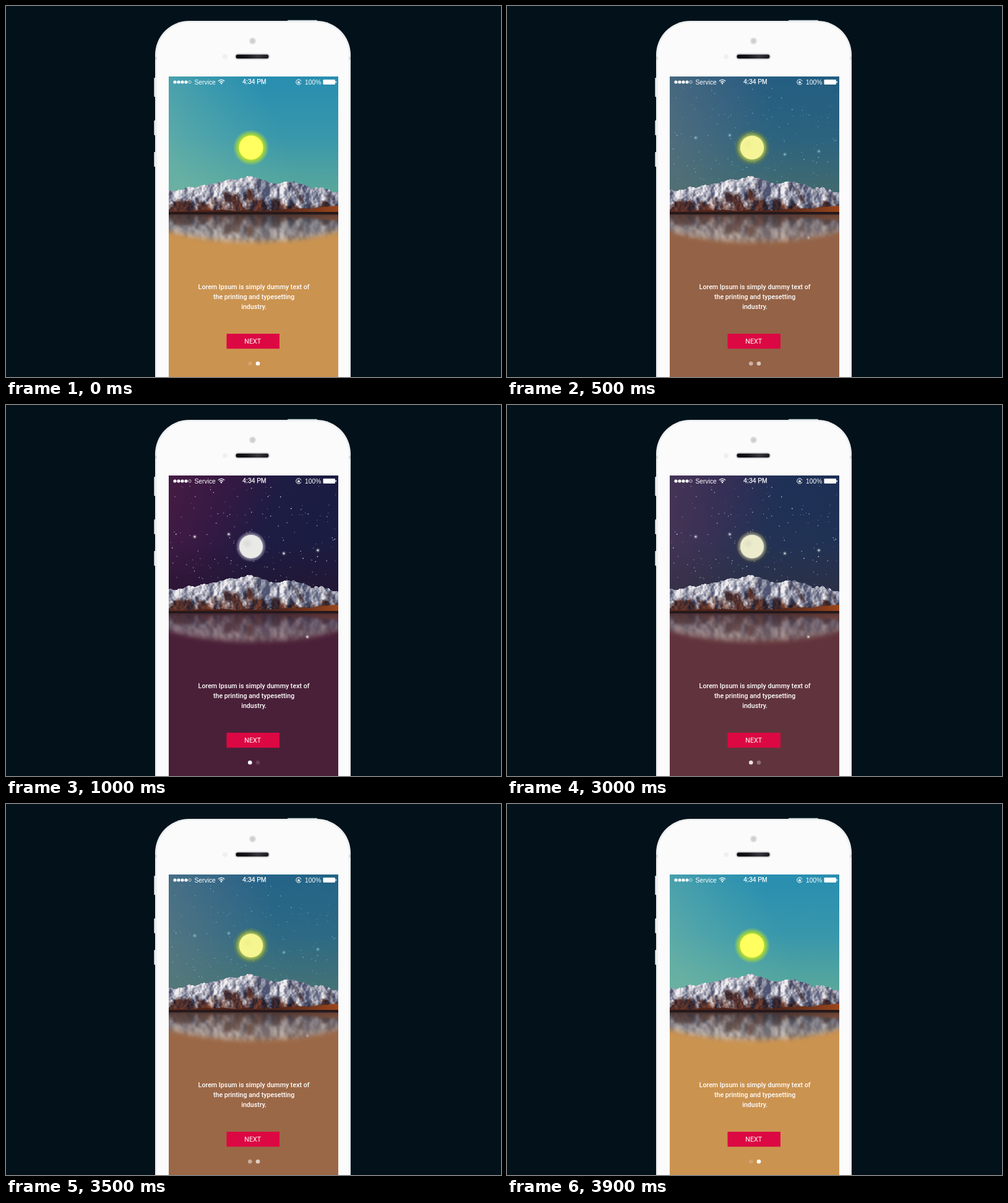
These frames come from a looping animation (800 px wide and 600 px high, 5900 ms). An HTML page with a canvas:

```html
<!DOCTYPE html>
<html lang="en">
<head>
<meta charset="utf-8">
<title>Day and night onboarding</title>
<style>
  html, body { margin: 0; width: 100%; height: 100%; overflow: hidden; background: #02111a; }
  canvas { display: block; }
</style>
</head>
<body>
<canvas id="stage" width="800" height="600"></canvas>
<script>
const ctx = document.getElementById('stage').getContext('2d');
const LOOP = 5900, STEP = 100;
const LEFT = 263, TOP = 114, WIDTH = 274, HEIGHT = 486;
const RIGHT = LEFT + WIDTH, SHORE = 331, WATER = 336;
const PEAKS = [[LEFT, 299], [320, 290], [355, 283], [398, 275], [430, 287], [460, 283], [493, 295], [508, 293], [RIGHT, 303]];

const clamp = (v, lo = 0, hi = 1) => Math.max(lo, Math.min(hi, v));
const mix = (a, b, k) => a + (b - a) * k;
const blend = (a, b, k) => a.map((v, i) => mix(v, b[i], k));

function seeded(seed) {
  return () => (seed = (seed * 16807) % 2147483647) / 2147483647;
}

function layer(draw) {
  const canvas = document.createElement('canvas');
  canvas.width = 800;
  canvas.height = 600;
  draw(canvas.getContext('2d'));
  return canvas;
}

function gradient(g, x0, y0, x1, y1, ...colors) {
  const fill = g.createLinearGradient(x0, y0, x1, y1);
  colors.forEach((c, i) => fill.addColorStop(i / (colors.length - 1), c));
  return fill;
}

function rect(g, x, y, w, h, fill, radius = 0) {
  g.fillStyle = fill;
  g.beginPath();
  g.roundRect(x, y, w, h, radius);
  g.fill();
}

function disc(g, x, y, r, fill) {
  g.fillStyle = fill;
  g.beginPath();
  g.arc(x, y, r, 0, 7);
  g.fill();
}

function arc(g, x, y, r, from, to, width) {
  g.strokeStyle = '#fff';
  g.lineWidth = width;
  g.beginPath();
  g.arc(x, y, r, from, to);
  g.stroke();
}

function glow(g, x, y, inner, outer, rgb, alpha) {
  const fill = g.createRadialGradient(x, y, inner, x, y, outer);
  fill.addColorStop(0, `rgba(${rgb},${alpha})`);
  fill.addColorStop(1, `rgba(${rgb},0)`);
  disc(g, x, y, outer, fill);
}

function label(g, text, x, y, font, align = 'left') {
  g.fillStyle = '#fff';
  g.font = font;
  g.textAlign = align;
  g.fillText(text, x, y);
}

function sparkle(g, x, y) {
  glow(g, x, y, 0, 4, '255,255,255', .6);
  disc(g, x, y, 1.1, '#fff');
}

// Smooth value noise on a seeded lattice, summed over octaves.
const lattice = Array.from({ length: 4096 }, seeded(2024));
function noise(x, y) {
  const i = Math.floor(x), j = Math.floor(y);
  const at = (a, b) => lattice[(a & 63) + 64 * (b & 63)];
  const ease = t => t * t * (3 - 2 * t);
  const u = ease(x - i), v = ease(y - j);
  return mix(mix(at(i, j), at(i + 1, j), u), mix(at(i, j + 1), at(i + 1, j + 1), u), v);
}
const terrain = (x, y) => .55 * noise(x / 13, y / 17) + .3 * noise(x / 6, y / 8) + .15 * noise(x / 2.5, y / 3);

function slopeY(x) {
  x = clamp(x, LEFT, RIGHT);
  const i = Math.max(1, PEAKS.findIndex(p => p[0] >= x));
  const [a, b] = [PEAKS[i - 1], PEAKS[i]];
  return mix(a[1], b[1], (x - a[0]) / (b[0] - a[0]));
}
const ridgeY = x => slopeY(x) + 4 * (noise(x / 5, 9) - .5);

const day = layer(g => {
  rect(g, LEFT, TOP, WIDTH, HEIGHT, '#cb9350');
  rect(g, LEFT, TOP, WIDTH, WATER - TOP, gradient(g, 400, TOP, 400, 310, '#288eb0', '#3897ab', '#5ca999'));
  rect(g, LEFT, TOP, WIDTH, WATER - TOP, gradient(g, LEFT, 240, 430, 170, 'rgba(118,184,166,.6)', 'rgba(100,180,172,0)'));
  glow(g, 396, 229, 18, 29, '205,238,20', .95);
  disc(g, 396, 229, 19.5, '#ffff60');
});

const night = layer(g => {
  rect(g, LEFT, TOP, WIDTH, HEIGHT, '#4a2039');
  rect(g, LEFT, TOP, WIDTH, WATER - TOP, gradient(g, LEFT, 150, 490, 240, '#431b43', '#351943', '#1d1c43', '#1b1c42'));
  rect(g, LEFT, 220, WIDTH, WATER - 220, gradient(g, 400, 220, 400, 300, 'rgba(38,20,46,0)', 'rgba(38,20,46,.65)'));
  const rnd = seeded(77);
  for (let i = 0; i < 170; i++) {
    const alpha = .35 + .6 * rnd();
    disc(g, LEFT + 2 + rnd() * (WIDTH - 4), 130 + rnd() * 160, .45 + rnd() * .45, `rgba(235,230,250,${alpha})`);
  }
  [[305, 213], [360, 209], [449, 240], [504, 235]].forEach(p => sparkle(g, ...p));
  glow(g, 396, 229, 18, 25, '225,222,235', .65);
  disc(g, 396, 229, 19, '#e9e9e6');
  glow(g, 390, 224, 0, 9, '205,205,205', .6);
});

// Snow thins out down the slope, and light falls from the left.
function mountainColor(x, y) {
  const depth = clamp((y - slopeY(x)) / (SHORE - slopeY(x)));
  const lean = x - depth * 12;
  const aspect = slopeY(lean + 9) - slopeY(lean - 9);
  const relief = terrain(x, y) - terrain(x + 3, y + 1);
  const lit = clamp(.5 - relief * 3 - aspect * .035);
  const cover = clamp((1 - depth * 1.25 + (terrain(lean + 40, y) - .5) * 2) * 1.7);
  const rock = blend([30, 28, 44], [128, 66, 46], lit * (.35 + .65 * depth));
  const snow = blend([78, 84, 114], [240, 237, 240], lit);
  return `rgb(${blend(rock, snow, cover)})`;
}

const mountains = layer(g => {
  for (let x = LEFT; x < RIGHT; x++) {
    for (let y = Math.round(ridgeY(x)); y < WATER; y++) rect(g, x, y, 1, 1, mountainColor(x, y));
    const shore = SHORE - 7 * clamp((x - 420) / 117) + 3 * (noise(x / 12, 30) - .5);
    rect(g, x, shore, 1, WATER - 2 - shore, gradient(g, LEFT, 0, RIGHT, 0, '#642a19', '#4b2218', '#54271a', '#9a461c'));
  }
  rect(g, LEFT, WATER - 3, WIDTH, 4, '#26191c');
});

const reflection = layer(g => {
  g.save();
  g.beginPath();
  g.rect(LEFT, WATER, WIDTH, 64);
  g.clip();
  rect(g, LEFT, WATER, WIDTH, 64, gradient(g, 0, WATER, 0, 390, '#30323d', '#6a6a70', '#96877a', '#b8935f'));
  g.filter = 'blur(1.8px)';
  g.globalAlpha = .5;
  g.translate(0, 2 * WATER - 2);
  g.scale(1, -1);
  g.drawImage(mountains, 0, 0);
  g.restore();
  g.globalCompositeOperation = 'destination-in';
  g.filter = 'blur(4px)';
  g.fillStyle = '#000';
  g.beginPath();
  g.ellipse(400, 325, 190, 57, 0, 0, 7);
  g.fill();
});

const phone = layer(g => {
  rect(g, 0, 0, 800, 600, '#02111a');
  rect(g, 455, 22.7, 48, 5, '#b9cfcf', 1);
  [116, 185, 236].forEach((y, i) => rect(g, 239.3, y, 5, i ? 24 : 31, '#e7e9ea', 1));
  rect(g, 241, 24, 316, 660, '#eceeef', 55);
  rect(g, 244, 26.5, 310, 660, '#fbfbfb', 52);
  for (const x of [241, 554]) rect(g, x, 82, 3, 5, '#d5d8d9');
  disc(g, 398.5, 56.5, 5.5, '#e2e2e3');
  disc(g, 398.5, 56.5, 3.5, '#cfcfd1');
  disc(g, 354, 82, 4, '#f0f0f1');
  rect(g, 369.5, 76.5, 57, 10.5, '#d8d8da', 5);
  rect(g, 371.5, 78.5, 53, 6.5, gradient(g, 371, 0, 425, 0, '#07070b', '#14141a', '#35353c', '#18181e'), 3.2);
});

const controls = layer(g => {
  const status = '10.3px "Liberation Sans", Arial, sans-serif';
  const body = '10.7px Roboto, sans-serif';
  for (let i = 0; i < 4; i++) disc(g, 273 + i * 6, 123, 2.6, '#fff');
  arc(g, 297, 123, 2.2, 0, 7, .7);
  label(g, 'Service', 304.5, 126.5, status);
  for (const r of [3.7, 6.6]) arc(g, 348, 126, r, -Math.PI * .77, -Math.PI * .23, 1.4);
  disc(g, 348, 125.3, 1.2, '#fff');
  label(g, '4:34 PM', 401.5, 126.3, status, 'center');
  g.lineWidth = .25;
  g.strokeText('4:34 PM', 401.5, 126.3);

  arc(g, 473, 123, 4.2, .4, 6, 1);
  arc(g, 473, 122.6, 1.2, Math.PI, 0, .8);
  rect(g, 471.2, 122.6, 3.6, 2.6, '#fff');
  label(g, '100%', 483, 126.5, status);
  rect(g, 512.5, 119, 19.5, 8, '#fff', 1.3);
  rect(g, 532.5, 121.5, 1.5, 3, '#fff', .7);

  ['Lorem Ipsum is simply dummy text of', 'the printing and typesetting', 'industry.']
    .forEach((line, i) => label(g, line, 400.6, 457.5 + i * 16.4, '500 ' + body, 'center'));
  rect(g, 356.5, 530, 85.5, 24.3, '#dc0843');
  label(g, 'NEXT', 398.7, 546, body, 'center');
});

// The fade advances in steps.
function nightAmount(time) {
  const t = Math.floor(time / STEP) * STEP;
  return t < 3000 ? clamp((t - 180) / 760) : 1 - clamp((t - 2800) / 1100);
}

function stamp(image, alpha = 1) {
  ctx.globalAlpha = alpha;
  ctx.drawImage(image, 0, 0);
}

function render(time) {
  const dark = nightAmount(time);
  stamp(phone);
  stamp(day);
  stamp(night, dark);
  stamp(reflection, mix(.95, .62, dark));
  stamp(mountains);
  ctx.globalAlpha = dark;
  sparkle(ctx, 487, 375);
  stamp(controls);
  disc(ctx, 394.3, 578.3, 3.3, `rgba(255,255,255,${mix(.16, 1, dark)})`);
  disc(ctx, 407, 578.3, 3.3, `rgba(255,255,255,${mix(1, .14, dark)})`);
}

const start = performance.now();
function tick() {
  render((performance.now() - start) % LOOP);
  requestAnimationFrame(tick);
}
tick();
</script>
</body>
</html>
```
